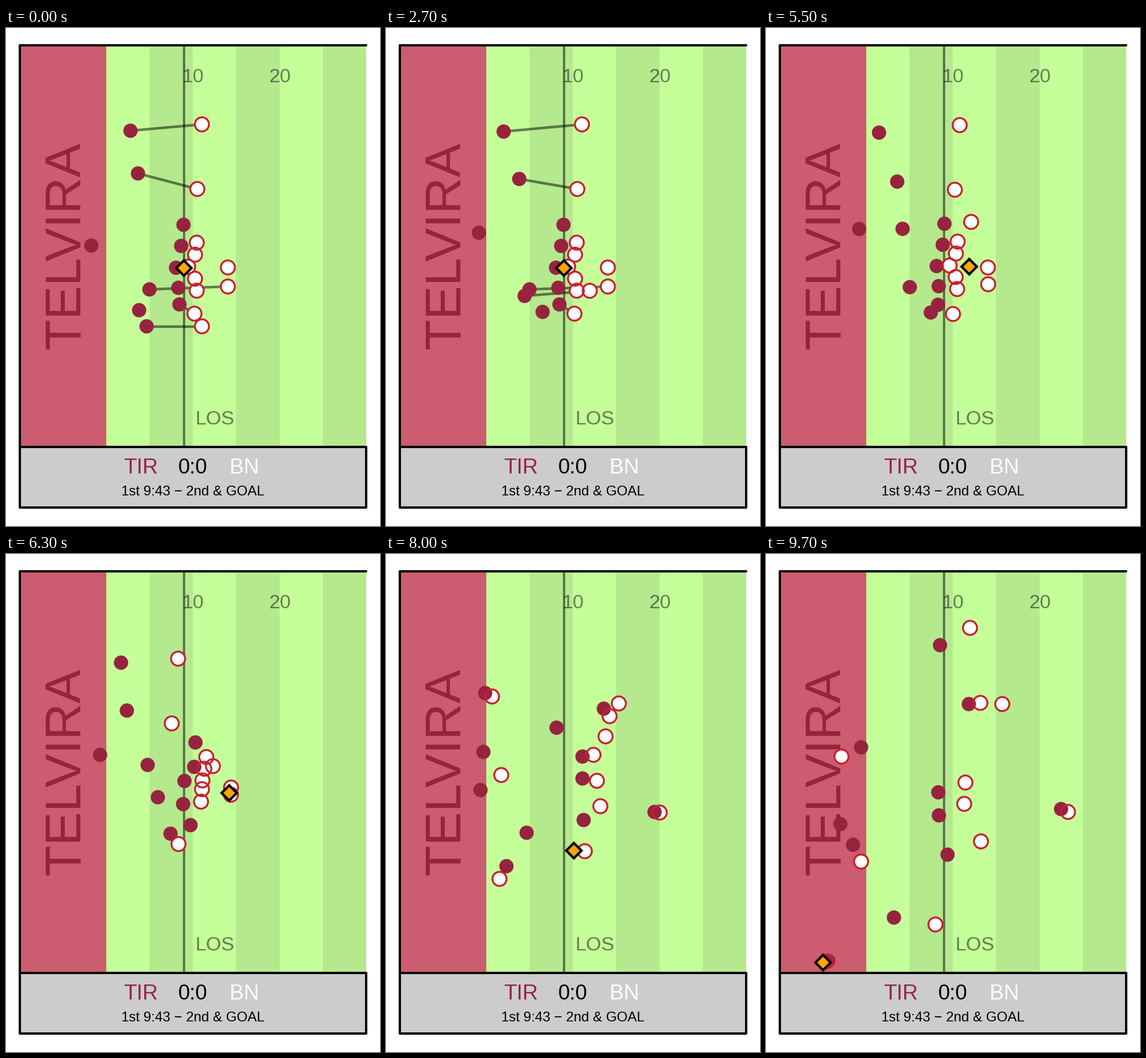
Write a matplotlib script that moves like this. It is 649 by 863 pixels and loops after 9.8 s.

```python
import numpy as np
import matplotlib.pyplot as plt
from matplotlib.animation import FuncAnimation
from matplotlib.patches import Circle, Polygon, Rectangle

W, H, DPI = 649, 863, 64
PX = 72 / DPI  # points per pixel
FRAMES, STEP = 98, 100
CLOCK = np.arange(FRAMES) * STEP / 1000
SNAP, RUSH, SETTLE, END = 5.2, 5.5, 8.0, 9.7
PLAY = (SNAP, 7.1, SETTLE, END)

HOME, AWAY_RIM = "#97233F", "#C8202D"
LIGHT, DARK = "#C4FF99", "#B4E98E"
FONT = "Liberation Sans"


def glide(*points, times=PLAY):
    """Smooth path through timed points: starts at rest, never overshoots."""
    t, p = np.array(times), np.array(points, float)
    h = np.diff(t)[:, None]
    slope = np.diff(p, axis=0) / h
    a, b = slope[:-1], slope[1:]
    same = a * b > 0
    inner = np.where(same, 2 * a * b / np.where(same, a + b, 1), 0)
    m = np.vstack([0 * slope[:1], inner, slope[-1:]])
    k = np.clip(np.searchsorted(t, CLOCK, side="right") - 1, 0, len(t) - 2)
    u = np.clip((CLOCK - t[k]) / h[k, 0], 0, 1)[:, None]
    return ((2 * u**3 - 3 * u**2 + 1) * p[k] + (3 * u**2 - 2 * u**3) * p[k + 1]
            + h[k] * ((u**3 - 2 * u**2 + u) * m[k] + (u**3 - u**2) * m[k + 1]))


def blend(times, points):
    return np.column_stack([np.interp(CLOCK, times, c) for c in zip(*points)])


def mark(mate, *gaps, drift=(0, 0)):
    """Follow an opponent at a changing gap; the early drift eases out."""
    fade = np.clip(1 - CLOCK / RUSH, 0, 1) ** 2
    return mate + blend((RUSH, SETTLE, END), gaps) + fade[:, None] * drift


def blocker(k, *later):
    """Lineman k of five: lined up, sliding left, then on his own."""
    stance = (332 - 16 * 0.25 ** abs(k - 2), 372 + 20.8 * k)
    return glide(stance, (367 - 4.5 * k, 325 + 22 * k), *later)


left_t = blocker(0, (388, 281), (372, 258))
left_g = blocker(1, (381, 316), (410, 260))
center = blocker(2, (360, 348), (346, 396))
right_g = blocker(3, (366, 393), (344, 433))
right_t = blocker(4, (372, 437), (373, 498))
wide_l = glide((340, 167), (248, 202), (184, 247), (131, 351))
wide_r = glide((332, 279), (240, 316), (200, 383), (165, 533))
tight = glide((327, 495), (262, 515), (197, 563), (294, 642))
runner = glide((385, 448), (397, 348), (404, 259), (354, 128))
passer = glide((385, 415), (429, 432), (475, 448), (524, 447),
               times=(6.0, 7.1, SETTLE, 9.0))
slot = glide((340, 517), (361, 396), (356, 336), (362, 428), (345, 515),
             (104, 706), times=(0.9, 3.9, RUSH) + PLAY[1:])
offence = [left_t, left_g, center, right_g, right_t, wide_l, wide_r, tight,
           runner, passer, slot]

corner_l = mark(wide_l, (-140, 13), (-12, -6), (34, -16), drift=(16, -2))
corner_r = mark(wide_r, (-100, -14), (-31, -40), (-14, -29), drift=(-3, -13))
backer = mark(runner, (-136, 5), (-108, 42), (-52, 30))
end_r = mark(tight, (-26, -16), (12, -22), (-72, -12))
nickel = mark(slot, (-119, 12), (-101, -32), (4, -1), drift=(23, -12))
defence = [
    corner_l, corner_r, backer, end_r, nickel,
    mark(wide_r, (-166, 68), (-36, 26), (-36, -65), drift=(-18, 30)),
    mark(passer, (-99, 78), (-9, -1), (-12, -5), drift=(-55, -4)),
    mark(left_t, (-23, -31), (-10, -13), (-20, 2)),
    mark(center, (-12, -36), (-19, 3), (-47, 17)),
    mark(right_g, (-33, -19), (-25, -4), (-44, 20)),
    mark(right_t, (-32, -5), (-29, 24), (-58, 23)),
]
matchups = [(corner_l, wide_l), (corner_r, wide_r), (backer, runner),
            (end_r, tight), (nickel, slot)]


def ball_path():
    """Snapped to the passer, thrown, then carried by the slot man."""
    grip, taken, thrown = (-3, -3), 5.7, 7.4
    hands = passer + grip
    carry = slot + blend((SETTLE, END), [(-19, -1), (-5, 2)])
    snap = blend((SNAP, taken), [(308.7, 416), hands[CLOCK >= taken][0]])
    throw = blend((thrown, SETTLE), [hands[CLOCK >= thrown][0],
                                     carry[CLOCK >= SETTLE][0]])
    phase = np.searchsorted((taken, thrown, SETTLE), CLOCK, side="right")
    return np.choose(phase[:, None], [snap, hands, throw, carry])


ball_track = ball_path()

fig = plt.figure(figsize=(W / DPI, H / DPI), dpi=DPI, facecolor="white")
ax = fig.add_axes([0, 0, 1, 1])
ax.set(xlim=(0, W), ylim=(H, 0))
ax.axis("off")


def block(x0, y0, x1, y1, color):
    ax.add_patch(Rectangle((x0, y0), x1 - x0, y1 - y0, fc=color, lw=0, zorder=1))


def label(x, y, text, size, color, **kw):
    ax.text(x, y, text, fontsize=size * PX, color=color, family=FONT,
            ha="center", va="baseline", zorder=3, **kw)


# Field
block(24, 30, 174, 726, "#CC5C6F")
for n in range(6):
    left = 174 + 75.15 * n
    block(left, 30, left + 75.15, 726, DARK if n % 2 else LIGHT)
block(24, 726, 625, 831, "#CCCCCC")
label(128.5, 376.5, "TELVIRA", 87.5, HOME, rotation=90, rotation_mode="anchor")
for yards in (10, 20):
    label(174.5 + 15.03 * yards, 94, str(yards), 34, "black", alpha=0.5)
label(362, 687, "LOS", 34, "black", alpha=0.5)
ax.plot([309.3] * 2, [30, 726], color="black", alpha=0.5, lw=4 * PX,
        solid_capstyle="butt", zorder=3)

# Frame and scoreboard
ax.plot([625, 24, 24, 625, 625, 24], [30, 30, 831, 831, 726, 726],
        color="black", lw=4 * PX, solid_capstyle="round",
        solid_joinstyle="round", zorder=9)
label(234, 772.5, "TIR", 37, HOME)
label(324.5, 772.5, "0:0", 36.5, "black")
label(414, 772.5, "BN", 37, "white")
label(324.5, 810, "1st 9:43 \u2212 2nd & GOAL", 24, "black")

# Moving parts: white discs lie under home dots, red rims above them
links = [ax.plot([], [], color="black", alpha=0.5, lw=4.5 * PX,
                 solid_capstyle="butt", zorder=4)[0] for _ in matchups]
dots = []


def add_dots(team, radius, zorder, **style):
    for path in team:
        dot = ax.add_patch(Circle(path[0], radius, zorder=zorder, **style))
        dots.append((dot, path))


add_dots(offence, 12.2, 5, fc="white", lw=0)
add_dots(defence, 12.4, 6, fc=HOME, lw=0)
add_dots(offence, 12.2, 7, fc="none", ec=AWAY_RIM, lw=3.3 * PX)

DIAMOND = 13.2 * np.array([(0, -1), (1, 0), (0, 1), (-1, 0)])
ball = ax.add_patch(Polygon(DIAMOND, closed=True, fc="#FFA500", ec="black",
                            lw=4.2 * PX, joinstyle="miter", zorder=8))


def draw(i):
    for dot, path in dots:
        dot.center = path[i]
    for link, (a, b) in zip(links, matchups):
        link.set_data(*zip(a[i], b[i]))
        link.set_visible(CLOCK[i] < SNAP)
    ball.set_xy(DIAMOND + ball_track[i])
    return [dot for dot, _ in dots] + links + [ball]


anim = FuncAnimation(fig, draw, frames=FRAMES, interval=STEP, repeat=True,
                     repeat_delay=0, init_func=lambda: draw(0))
plt.show()
```
